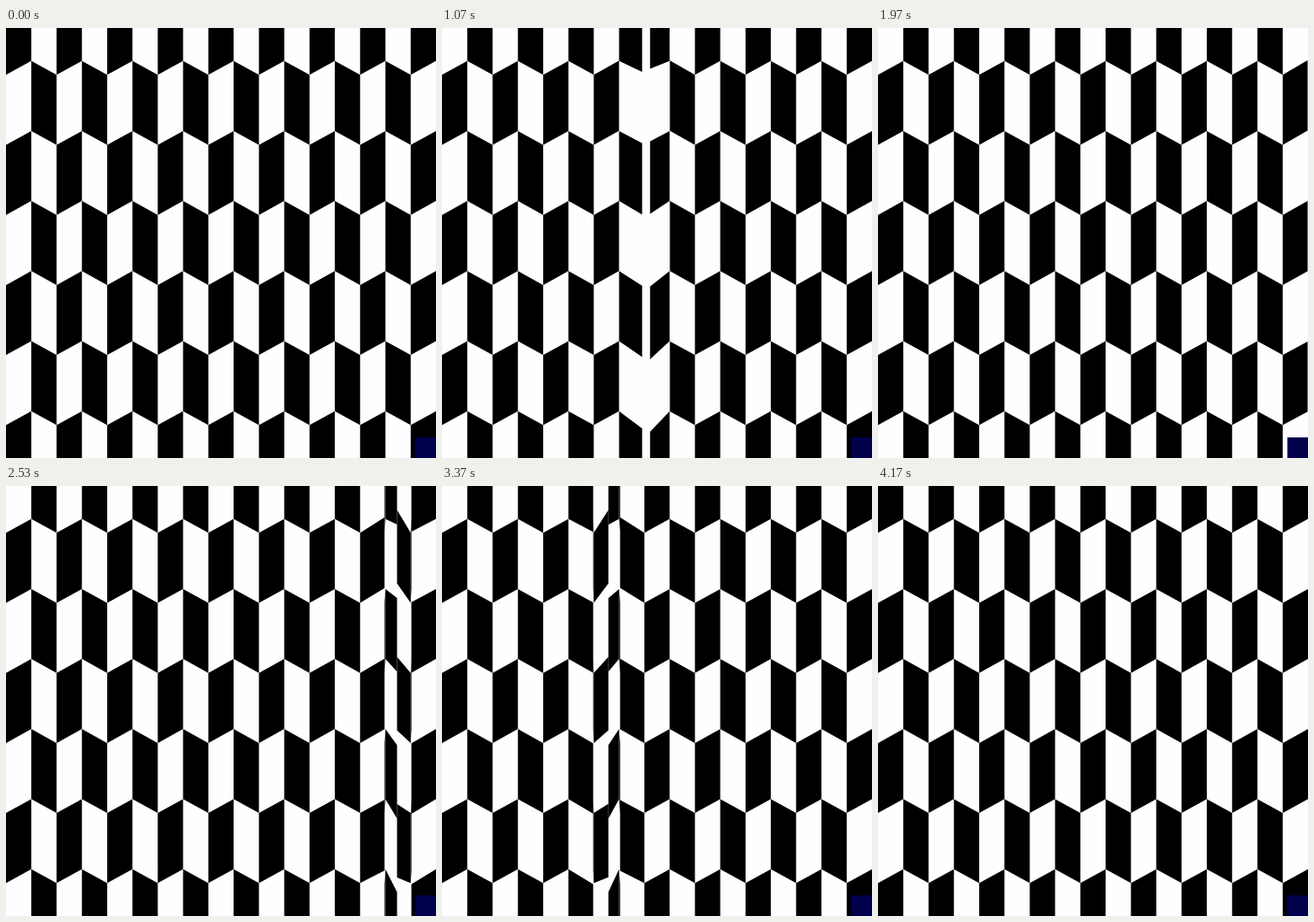
These frames come from a looping animation (480 by 480 pixels, 4310 ms). An HTML page with a canvas:

```html
<!DOCTYPE html>
<html>
<head>
<meta charset="utf-8">
<style>
html, body { margin: 0; width: 100%; height: 100%; overflow: hidden; background: #fffdff; }
canvas { display: block; width: 480px; height: 480px; }
</style>
</head>
<body>
<canvas id="stage" width="480" height="480"></canvas>
<script>
const ctx = document.getElementById('stage').getContext('2d');
const WHITE = '#fffdff', BLACK = '#000', NAVY = '#00004d';
const LOOP = 4310, COLS = 17, W = 480 / COLS, MID = 240;
const ROW = 78.2, SLANT = 7.8;
const STAGGER = 94.5, TURN = 472;   // ms between columns, ms per turn
const OUT_START = 110, BACK_START = 2197;
const BULGE = 0.12, THIN = 7;

const ease = p => {
  p = Math.min(1, Math.max(0, p));
  return p < 0.5 ? 0.5 * (2 * p) ** 5 : 1 - 0.5 * (2 - 2 * p) ** 5;
};

// Height of row boundary k at column edge b
const edgeY = (k, b, scale) =>
  MID + ((k - 2.5) * ROW + (b % 2 ? -SLANT : SLANT)) * scale;

function drawFace(col, x0, x1, s0, s1, flipped) {
  if (x1 - x0 < 0.1) return;
  ctx.beginPath();
  for (let row = 0; row < 8; row++) {
    if ((row + col + flipped) % 2) continue;
    ctx.moveTo(x0, edgeY(row - 1, col, s0));
    ctx.lineTo(x1, edgeY(row - 1, col + 1, s1));
    ctx.lineTo(x1, edgeY(row, col + 1, s1));
    ctx.lineTo(x0, edgeY(row, col, s0));
    ctx.closePath();
  }
  ctx.fill();
}

// Hairline left in the seam beside a nearly finished turn
function drawSeam(col, x, scale) {
  for (let row = col % 2; row < 8; row += 2) {
    const top = MID + (row - 3.5) * ROW * scale;
    ctx.fillRect(x - 0.5, top, 0.5, ROW * scale);
  }
}

function drawColumn(col, turn, outward) {
  const left = col * W, right = left + W;
  const angle = turn * Math.PI / 2;
  const sin = Math.sin(angle), cos = Math.cos(angle);
  const corner = left + W / 2 * (1 + sin - cos);
  const scale = 1 + BULGE * (sin + cos - 1);
  const thinLeft = outward && corner - left < THIN;
  const thinRight = outward && right - corner < THIN;

  if (!thinLeft) drawFace(col, left, corner, 1, scale, 1);
  if (!thinRight) drawFace(col, corner, right, scale, 1, 0);
  else if (right - corner > 3) drawSeam(col + 1, right, scale);
}

function draw(t) {
  ctx.fillStyle = WHITE;
  ctx.fillRect(0, 0, 480, 480);
  ctx.fillStyle = BLACK;
  const outward = t < BACK_START;
  for (let col = 0; col < COLS; col++) {
    const turn = outward
      ? ease((t - OUT_START - col * STAGGER) / TURN)
      : 1 - ease((t - BACK_START - (COLS - 1 - col) * STAGGER) / TURN);
    drawColumn(col, turn, outward && turn > 0 && turn < 1);
  }
  ctx.fillStyle = NAVY;
  ctx.fillRect(457, 457, 23, 23);
}

const start = performance.now();
function tick() {
  draw((performance.now() - start) % LOOP);
  requestAnimationFrame(tick);
}
tick();
</script>
</body>
</html>
```
